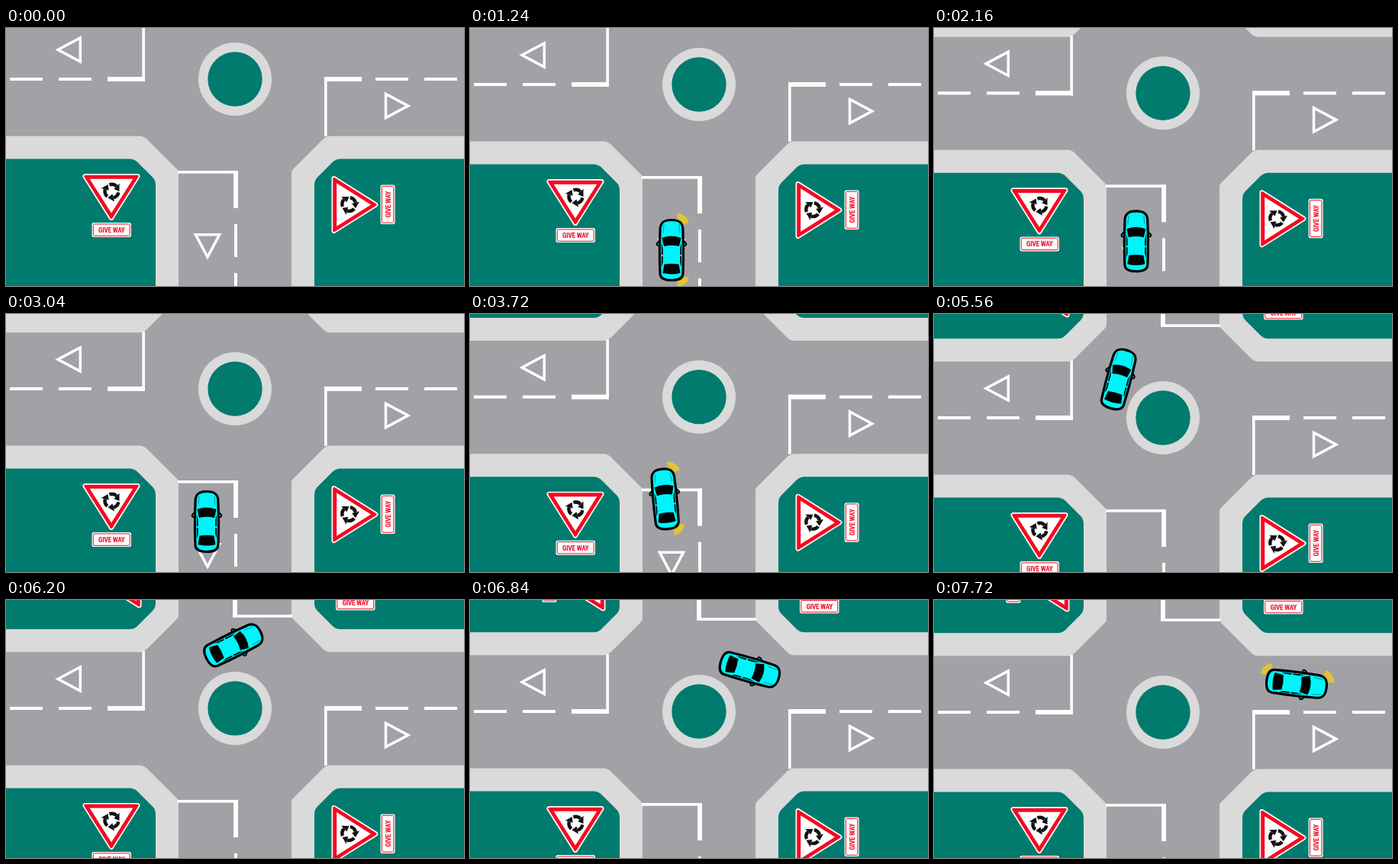
An HTML page that plays this animation: 600x338 px, repeating every 7.76 s.

```html
<!DOCTYPE html>
<html lang="en">
<head>
<meta charset="utf-8">
<title>Turning right at a roundabout</title>
<style>
html, body { margin: 0; width: 100%; height: 100%; overflow: hidden; background: #a2a1a6; }
svg { display: block; width: 100vw; height: 100vh; }
.kerb { fill: #dadada; }
.grass { fill: #007b6e; }
.paint { fill: #fff; }
.arrow { fill: none; stroke: #fff; stroke-width: 3.5; }
.sign text {
  font: 700 9.2px "Roboto Condensed", Roboto, sans-serif;
  font-stretch: 75%;
  letter-spacing: -.2px;
  fill: #ee1027;
  text-anchor: middle;
}
.lamp { fill: none; stroke: #e3c531; stroke-width: 3.4; }
</style>
</head>
<body>
<svg viewBox="0 0 600 338" preserveAspectRatio="none">
  <defs>
    <g id="corner">
      <path class="kerb" d="M74 400V122Q74 120 76 118L115 79Q119.500 74.500 125 74.500H400V400Z"/>
      <path class="grass" d="M104 400V139Q104 132.500 108 128.500L127.500 109Q132 104.500 138 104.500H400V400Z"/>
    </g>
    <path id="bend" d="M8 0A8 8 0 0 1 3.400 7.250" fill="none" stroke="#111" stroke-width="4"/>
    <path id="head" d="M1.500 3.200L5.300 11.500L-3.200 8.300Z" fill="#111"/>
    <g id="turn"><use href="#bend"/><use href="#head"/></g>
    <g id="sign" class="sign">
      <g stroke-linejoin="round">
        <path id="plate" d="M-34.300 3.700H34.300L0 58.200Z" fill="#fff" stroke="#fff" stroke-width="6.400"/>
        <path d="M-34.300 3.700H34.300L0 58.200Z" fill="#f50a20" stroke="#f50a20" stroke-width="3"/>
        <path d="M-28.300 7.200H28.300L0 52Z" fill="#fff"/>
      </g>
      <g transform="translate(.5 23.300) scale(1.120)">
        <use href="#turn" transform="rotate(10)"/>
        <use href="#turn" transform="rotate(130)"/>
        <use href="#turn" transform="rotate(250)"/>
      </g>
      <rect x="-25.500" y="64.600" width="51.500" height="19" rx="2.500" fill="#fff"/>
      <rect x="-23.700" y="66.400" width="47.900" height="15.400" rx="1.500" fill="none" stroke="#f50a20"/>
      <text x=".3" y="77.500">GIVE WAY</text>
    </g>
    <g id="lamps" class="lamp">
      <path id="fan"/>
      <use href="#fan" transform="scale(1 -1)"/>
    </g>
  </defs>

  <g id="world">
    <use href="#corner"/>
    <use href="#corner" transform="scale(-1 1)"/>
    <g transform="translate(0 .8)">
      <use href="#corner" transform="scale(1 -1)"/>
      <use href="#corner" transform="scale(-1)"/>
    </g>
    <g id="arms"></g>
    <circle class="kerb" r="48"/>
    <circle class="grass" r="35.700"/>
    <use href="#sign" transform="translate(-162 123.500)"/>
    <use href="#sign" transform="translate(126 164.500) rotate(-90)"/>
    <use href="#sign" transform="translate(157.500 -212)"/>
    <use href="#sign" transform="translate(-122 -169) rotate(90)"/>

    <g id="car">
      <use id="right" href="#lamps"/>
      <use id="left" href="#lamps" transform="scale(-1 1)"/>
      <path d="M-15 -13L-19 -9Q-20 -6 -17 -6H-14ZM15 -13L19 -9Q20 -6 17 -6H14Z" fill="#00e6ee" stroke="#000" stroke-width="2"/>
      <path d="M0 -39.500C9 -39.500 14 -37 14.800 -29L15.500 -8V12L15 31C14.500 37 10 39.500 0 39.500S-14.500 37 -15 31L-15.500 12V-8L-14.800 -29C-14 -37 -9 -39.500 0 -39.500Z" fill="#00f4fa" stroke="#000" stroke-width="3.200"/>
      <path d="M-12.500 -16Q0 -21 12.500 -16L10 -5Q0 -7.500 -10 -5Z"/>
      <path d="M-9.500 18.500Q0 17 9.500 18.500L11.500 30Q0 33 -11.500 30Z"/>
      <path d="M-13 -10L-11.300 -2V6H-13ZM-13 8H-11.300V16L-13 22ZM13 -10L11.300 -2V6H13ZM13 8H11.300V16L13 22Z"/>
      <path d="M-10 -34L-11 -22M10 -34L11 -22" stroke="#009fa8" fill="none"/>
    </g>
  </g>
</svg>
<script>
const LOOP = 7760, STEP = 40, BLINK = 640;
const get = id => document.getElementById(id);

// One approach lane: rotation, shift along the road, sideways shift, extra dash shift, arrow place
const arm = (turn, along, side, dash, arrowX, arrowY) => {
  const bar = (x, y, w, h) => `<rect class="paint" x="${x}" y="${y}" width="${w}" height="${h}"/>`;
  return `<g transform="rotate(${turn}) translate(${side} ${along})">
    ${bar(-75 - side, 118, 78 + side, 3.6)}${bar(-3, 118, 6, 49)}
    ${bar(-2, 188 + dash, 4, 43)}${bar(-2, 252 + dash, 4, 43)}
    <path class="arrow" d="M-15.600 0H15.600L0 29.250Z" transform="translate(${arrowX - side} ${arrowY - along})"/>
  </g>`;
};
get("arms").innerHTML =
  arm(0, 2, 1, 0, -36, 203.7) + arm(90, 0, 0, 0, -38.5, 202.7) +
  arm(180, 1, 0, 0, -36, 202.7) + arm(270, -1, 0, -3, -35, 197.5);

// Concentric arcs spreading out from a lamp
const polar = (r, deg) => {
  const a = deg * Math.PI / 180;
  return `${6 + r * Math.cos(a)} ${-31 + r * Math.sin(a)}`;
};
get("fan").setAttribute("d", [8.5, 12.3, 16]
  .map(r => `M${polar(r, -84)}A${r} ${r} 0 0 1 ${polar(r, -16)}`).join(""));

// Time followed by values
const camera = [[0, 67], [1240, 74], [3040, 98], [4400, 119.5], [5560, 136], [6840, 146], [7720, 147]];
const drive = [
  [0, -36, 322, 0], [1240, -36, 217, 0], [3040, -37, 174, 0],
  [4400, -55, 80.5, -10.6], [4980, -65, 16, 2], [5560, -58, -50.5, 15],
  [6180, -4, -83, 62], [6840, 66.5, -54.5, 106], [7720, 175, -37, 97]
];

// Smooth curve through the keys, flat at turning points
function sample(keys, t, n) {
  const last = keys.length - 1;
  const rate = (a, b) => (keys[b][n] - keys[a][n]) / (keys[b][0] - keys[a][0]);
  const slope = i => {
    if (i === 0) return rate(0, 1);
    if (i === last) return rate(last - 1, last);
    return rate(i - 1, i) * rate(i, i + 1) <= 0 ? 0 : rate(i - 1, i + 1);
  };
  let i = 0;
  while (i < last - 1 && t >= keys[i + 1][0]) i++;
  const span = keys[i + 1][0] - keys[i][0];
  const u = (t - keys[i][0]) / span, v = 1 - u;
  return keys[i][n] * v * v * (1 + 2 * u) + keys[i + 1][n] * u * u * (3 - 2 * u)
    + span * u * v * (slope(i) * v - slope(i + 1) * u);
}

function draw(now) {
  const t = Math.floor(now / STEP) * STEP % LOOP;
  const [x, y, angle] = [1, 2, 3].map(n => sample(drive, t, n));
  get("world").setAttribute("transform", `translate(300 ${sample(camera, t, 1)})`);
  get("car").setAttribute("transform", `translate(${x} ${y}) rotate(${angle})`);
  const lit = (t + 128) % BLINK < BLINK / 2;
  get("right").style.display = lit && t < 5600 ? "" : "none";
  get("left").style.display = lit && t > 6200 ? "" : "none";
  requestAnimationFrame(draw);
}
draw(0);
</script>
</body>
</html>
```
